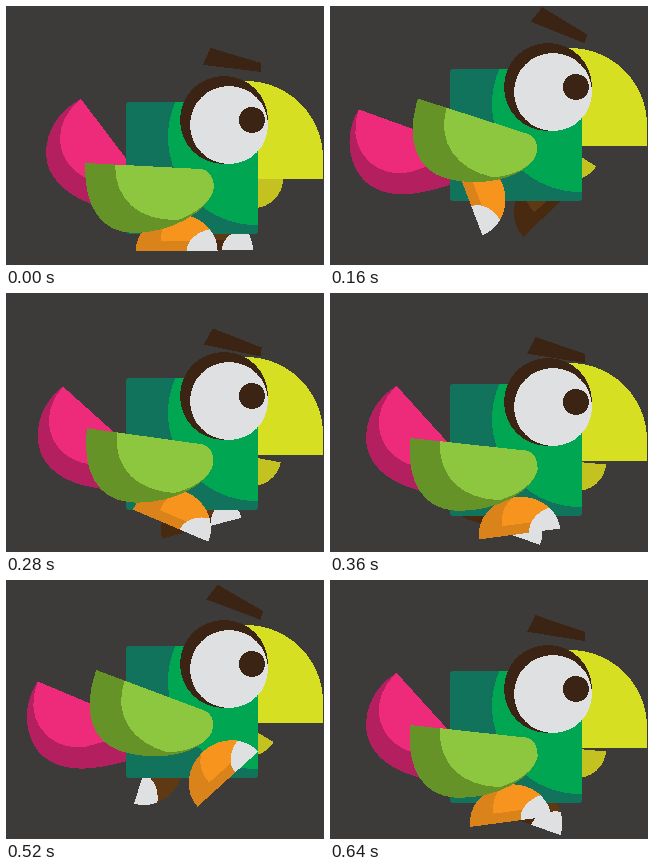
Animation of 318x259 px, one loop 680 ms. Source, as an HTML page:

```html
<!DOCTYPE html>
<html lang="en">
<head>
<meta charset="utf-8">
<title>Walking parrot</title>
<style>
  html, body { margin: 0; width: 100%; height: 100%; overflow: hidden; background: #3c3b39; }
  svg { display: block; width: 318px; height: 259px; shape-rendering: crispEdges; }
</style>
</head>
<body>
<svg viewBox="0 0 318 259">
  <defs>
    <clipPath id="torso"><rect x="120" y="96" width="132" height="132" rx="3"/></clipPath>
    <path id="thigh" d="M-41 0A41 37 0 0 1 41 0Z"/>
    <path id="shin" d="M-16 -10Q-16 -28 -2 -37A41 37 0 0 1 34 -21L26 -10Z"/>
    <path id="foot" d="M10 0A31 23 0 0 1 33 -22A41 37 0 0 1 41 0Z"/>
  </defs>
  <g id="bird">
    <g id="tail">
      <path fill="#b41f5f" d="M75 93C53 104 40 125 40 147C40 171 60 188 83 197C95 202 108 206 125 209V159Z"/>
      <path fill="#ee2a7b" d="M75 93C60 105 54 119 54 132C54 153 68 168 85 174L125 184V159Z"/>
    </g>
    <g id="backLeg">
      <use href="#thigh" fill="#472a0f"/>
      <use href="#shin" fill="#5f3913"/>
      <use href="#foot" fill="#dfe0e2"/>
    </g>
    <path id="jaw" fill="#c4c220" d="M236 173H277A29 29 0 0 1 248 202H236Z"/>
    <path fill="#d7df23" d="M230 75H240A77 77 0 0 1 317 152V173H230Z"/>
    <g clip-path="url(#torso)">
      <rect x="120" y="96" width="132" height="132" fill="#11735b"/>
      <circle cx="250" cy="131" r="88" fill="#00a651"/>
    </g>
    <circle cx="218" cy="114" r="44" fill="#3c2415"/>
    <circle cx="223" cy="119" r="39" fill="#dfe0e2"/>
    <circle cx="246" cy="114" r="13" fill="#3c2415"/>
    <path id="brow" fill="#3c2415" d="M0 0L-57.5 -7L-50 -24L.5 -9Z"/>
    <g id="frontLeg">
      <use href="#thigh" fill="#d9831a"/>
      <use href="#shin" fill="#f7941e"/>
      <use href="#foot" fill="#dfe0e2"/>
    </g>
    <g id="wing">
      <path fill="#659327" d="M79 157L195 163Q207 165 208 181C205 205 165 227 128 227C95 227 79 200 79 163Z"/>
      <path fill="#8dc63f" d="M109 158.5L195 163Q207 165 208 181C206 196 190 207 172 214C135 215 109 196 109 158.5Z"/>
    </g>
  </g>
</svg>
<script>
// The walk takes 2/3 s, drawn every 40 ms; the loop closes on the next step.
const LOOP = 680, STEP = 40, WALK = 2000 / 3;

// Linear swing through four poses: ground, top, ground, top.
function swing(phase, ...poses) {
  const beat = phase * 4, i = Math.floor(beat);
  const from = poses[i], to = poses[(i + 1) % 4];
  return from + (to - from) * (beat - i);
}

const set = (id, value) => document.getElementById(id).setAttribute('transform', value);
const turn = (id, angle, x, y) => set(id, `rotate(${angle} ${x} ${y})`);
const step = (id, x, hip, ankle) =>
  set(id, `translate(${x} 192) rotate(${hip}) translate(0 54.5) rotate(${ankle - hip})`);

function draw(now) {
  const phase = Math.floor((now % LOOP) / STEP) * STEP / WALK;
  const move = (...poses) => swing(phase, ...poses);
  const lift = Math.round(move(0, 34, 0, 34));
  const browY = 70.5 - 4.6 * Math.cos(2 * Math.PI * phase);

  set('bird', `translate(0 ${-lift})`);
  turn('tail', -lift, 125, 193);
  turn('jaw', lift, 237, 165);
  turn('wing', move(0, 15.5, 0, 20), 204, 175);
  set('brow', `translate(254.5 ${browY}) rotate(${lift * 0.45})`);
  step('frontLeg', 182, move(12, 56, 1, -55), move(0, 72, 0, -48));
  step('backLeg', 190, move(-17, -38, 9, 77), move(0, -46, 0, 122));
}

function tick(now) {
  draw(now);
  requestAnimationFrame(tick);
}
draw(0);
requestAnimationFrame(tick);
</script>
</body>
</html>
```
